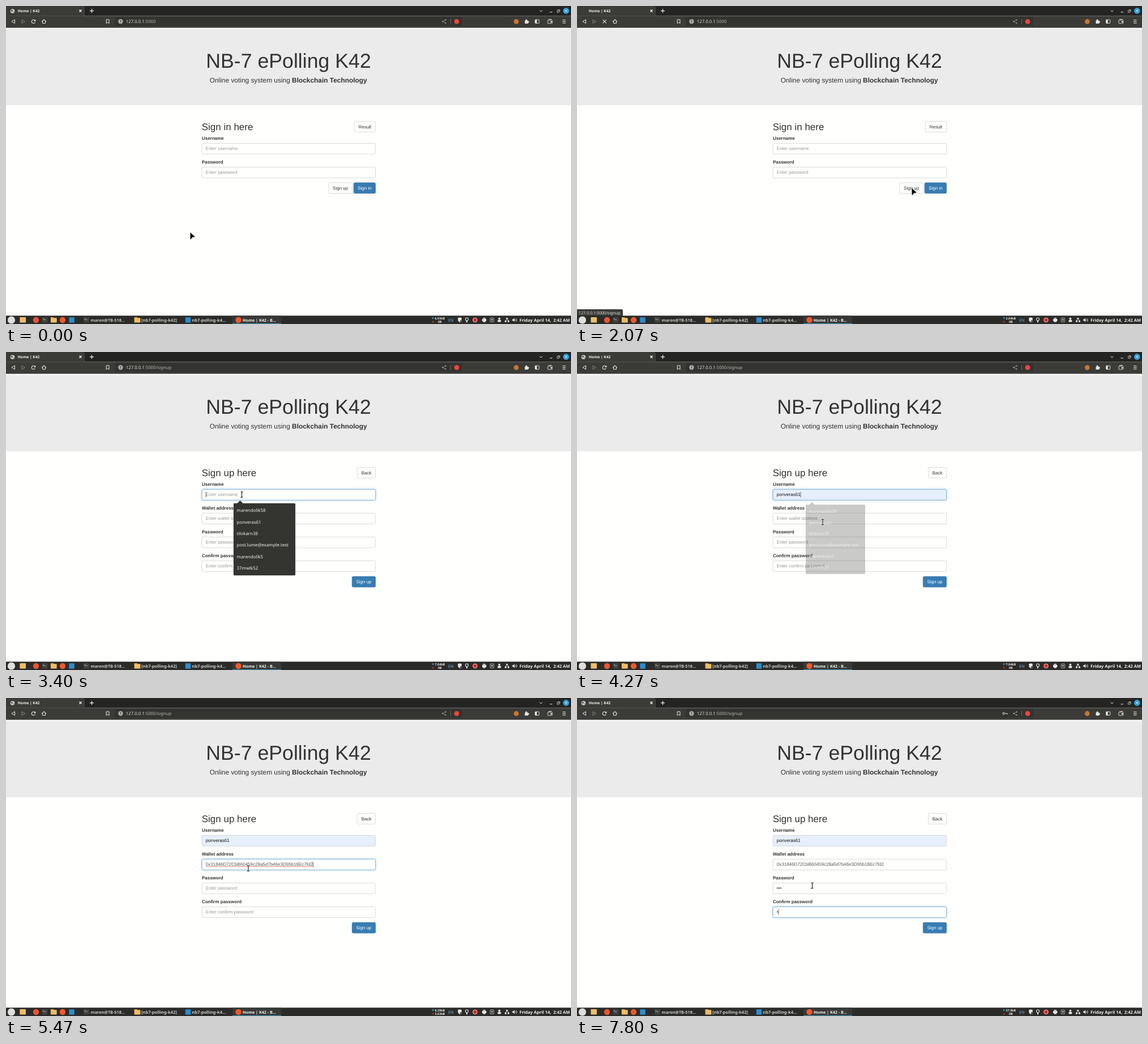
An HTML page with a canvas that plays this animation: 998x561 px, repeating every 8000 ms.

```html
<!DOCTYPE html>
<html lang="en">
<head>
<meta charset="utf-8">
<title>Sign up demo</title>
<style>
  html, body { margin: 0; width: 100%; height: 100%; overflow: hidden; background: #fffffd; }
  canvas { display: block; }
</style>
</head>
<body>
<canvas id="stage" width="998" height="561"></canvas>
<script>
const g = document.getElementById('stage').getContext('2d');
g.textRendering = 'geometricPrecision';
const LOOP = 8000;
const PAGE = '"Liberation Sans", Arial, sans-serif';
const UI = '"Noto Sans", "Open Sans", sans-serif';
const INK = '#333', LIGHT = '#e6e6e3', DARK = '#343431', PAPER = '#fffffd';
const USER = 'ponveras61';
const USERS = ['marendolik58', USER, 'tilokarn38', 'post.lume@example.test', 'marendolik5', '37mwlk52'];
const WALLETS = [
  '0x2a973650b14E8dAc9b5f36D4a1527A8c3394615b',
  '0x31846D72CbB60459c28a5d7b46e3D95b18Ec7fd2',
  '0x904C7a2D8e3fd185A86B2590413c7b382Ead9973',
  '0xc8B239a61b4d7f50342d9ae6c881356BDADAfCF7'
];

// Times in ms
const HOVER = 1400, LOADING = 2000, LOADED = 2330, READY = 2530;
const USER_FOCUS = 3200, USER_PICK = 4200;
const WALLET_FOCUS = 4600, WALLET_PICK = 5400;
const PASS_FOCUS = 6150, PASS_KEYS = [6670, 6870, 7070];
const CONFIRM_FOCUS = 7470, CONFIRM_KEYS = [7790];

const POINTER = [
  [0, 326, 400], [1030, 326, 400], [1200, 577, 321], [1400, 577, 321], [1600, 592, 322],
  [2400, 592, 322], [2900, 425, 262], [3130, 416.5, 251.5], [3560, 416.5, 251.5],
  [3730, 428, 296], [3930, 434, 300], [4330, 434, 300], [4500, 428, 300.5],
  [5800, 428, 300.5], [6100, 415.5, 331]
];
const TRAFFIC = [
  [0, '6.93kB', '0B'], [800, '4.12kB', '0B'], [1730, '2.04kB', '0B'], [2670, '8.31kB', '0B'],
  [3330, '7.04kB', '0B'], [4600, '5.35kB', '0B'], [5400, '6.29kB', '3.53kB'],
  [6200, '9.18kB', '0B'], [7530, '27.9kB', '0B']
];

const clamp = v => Math.max(0, Math.min(1, v));
const ramp = (t, start, length) => clamp((t - start) / length);
const smooth = p => p * p * (3 - 2 * p);

function text(s, x, y, size, color, { font = PAGE, bold = false, align = 'left' } = {}) {
  g.font = `${bold ? 'bold ' : ''}${size}px ${font}`;
  g.textAlign = align;
  g.fillStyle = color;
  g.fillText(s, x, y);
  return g.measureText(s).width;
}
function rect(x, y, w, h, color) {
  g.fillStyle = color;
  g.fillRect(x, y, w, h);
}
function box(x, y, w, h, r, fill, stroke, width = 0.7) {
  g.beginPath();
  g.roundRect(x, y, w, h, r);
  if (fill) { g.fillStyle = fill; g.fill(); }
  if (stroke) { g.strokeStyle = stroke; g.lineWidth = width; g.stroke(); }
}
function circle(x, y, r, fill, stroke, width = 1) {
  g.beginPath();
  g.arc(x, y, r, 0, 7);
  if (fill) { g.fillStyle = fill; g.fill(); }
  if (stroke) { g.strokeStyle = stroke; g.lineWidth = width; g.stroke(); }
}
function path(points, { fill, stroke, width = 1, close = !!fill }) {
  g.beginPath();
  for (let i = 0; i < points.length; i += 2) g.lineTo(points[i], points[i + 1]);
  if (close) g.closePath();
  if (fill) { g.fillStyle = fill; g.fill(); }
  if (stroke) { g.strokeStyle = stroke; g.lineWidth = width; g.stroke(); }
}
function cross(x, y, r, color, width = 1) {
  path([x - r, y - r, x + r, y + r], { stroke: color, width });
  path([x - r, y + r, x + r, y - r], { stroke: color, width });
}

function tabStrip(t) {
  rect(0, 0, 998, 17.5, '#242522');
  rect(0, 0, 138, 17.5, '#3b3b38');
  rect(138, 2, 0.7, 15, '#555552');
  if (t < LOADING || t >= READY) {
    circle(11.5, 9, 3.8, '#cfcfcc');
    path([8.5, 7.5, 11, 6.5, 12, 8.5, 10, 10.5], { fill: '#4b4b48' });
    path([12.5, 10, 14.5, 9, 13.5, 11.5], { fill: '#4b4b48' });
  }
  text('Home | K42', 20.8, 11.3, 6.6, '#f2f2ef', { font: UI, bold: true });
  cross(131.5, 8.5, 2, '#f2f2ef', 1.2);
  rect(148, 8, 7, 1.2, '#f2f2ef');
  rect(150.9, 5.1, 1.2, 7, '#f2f2ef');
  path([942.6, 7.5, 945, 10, 947.4, 7.5], { stroke: LIGHT });
  rect(960.5, 10.3, 4.5, 1, LIGHT);
  box(973.5, 7.8, 3.4, 3.4, 0, null, LIGHT);
  path([974.8, 6.6, 978.2, 6.6, 978.2, 10], { stroke: LIGHT, width: 0.7 });
  circle(989.3, 8.5, 5.4, '#2f9fd6');
  cross(989.3, 8.5, 1.9, '#fff');
}

function toolbar(t) {
  rect(0, 17.5, 998, 21, '#3b3b38');
  box(192, 19.5, 614, 15.5, 2, '#333330');
  path([15.5, 24, 15.5, 30.6, 10, 27.3], { stroke: LIGHT, close: true });
  path([28, 24, 28, 30.6, 33.5, 27.3], { stroke: '#858582', close: true });
  if (t >= LOADING && t < READY) {
    cross(48.7, 27.3, 3.1, LIGHT, 1.1);
  } else {
    g.beginPath();
    g.arc(48.5, 27.4, 3.1, 0.4, 5.5);
    g.strokeStyle = LIGHT;
    g.lineWidth = 1.1;
    g.stroke();
    path([52.3, 23.6, 52.3, 27, 49, 27], { fill: LIGHT });
  }
  path([63, 27.6, 67, 24, 71, 27.6], { stroke: LIGHT, width: 1.1 });
  path([64.6, 27, 64.6, 30.6, 69.4, 30.6, 69.4, 27], { stroke: LIGHT });
  path([177.2, 24, 182, 24, 182, 30.8, 179.6, 28.8, 177.2, 30.8], { stroke: LIGHT, close: true });
  circle(202.4, 27.3, 4.2, '#aaaaa7');
  rect(201.9, 24.8, 1, 3, DARK);
  rect(201.9, 28.6, 1, 1, DARK);

  const host = text('127.0.0.1', 211.8, 30.2, 7.75, '#dededb', { font: UI });
  text(t < LOADED ? ':5000' : ':5000/signup', 211.8 + host, 30.2, 7.75, '#b4b4b1', { font: UI });

  if (t >= PASS_KEYS[1]) {
    circle(753.6, 27.3, 1.7, null, '#b8b8b5', 1.2);
    path([755.4, 27.3, 760, 27.3, 760, 29], { stroke: '#b8b8b5', width: 1.3 });
  }
  path([776.4, 24.6, 771.3, 27.3, 776.4, 30], { stroke: '#aaaaa7', width: 0.7 });
  for (const [x, y] of [[776.4, 24.6], [771.3, 27.3], [776.4, 30]]) circle(x, y, 1.1, '#aaaaa7');
  rect(785, 22.5, 0.8, 9.5, '#777774');
  circle(796, 27.4, 4.4, '#e9473b');
  circle(901.3, 27.5, 4.4, '#c9762f');
  rect(916.5, 25.6, 5.8, 5.4, LIGHT);
  circle(919, 25, 1.5, LIGHT);
  circle(922.5, 28, 1.5, LIGHT);
  box(934.7, 24.2, 7, 6.3, 0.8, null, LIGHT, 0.9);
  rect(934.7, 24.2, 3, 6.3, LIGHT);
  box(957, 25, 7.8, 5.8, 0.8, null, LIGHT, 0.9);
  path([958, 24, 963.5, 23.4], { stroke: LIGHT });
  rect(961.6, 27, 3.2, 1.9, LIGHT);
  for (const y of [24.2, 26.9, 29.6]) rect(983, y, 5.6, 1, LIGHT);
}

function folder(x) {
  box(x - 5.4, 549, 5.5, 4, 0.7, '#d99a35');
  box(x - 5.4, 550.2, 10.8, 8.4, 0.8, '#f0bd66');
}
function terminal(x) {
  box(x - 5, 549, 10, 9.6, 1, '#42433f');
  path([x - 3.2, 551, x - 1.8, 552.2, x - 3.2, 553.4], { stroke: '#fff', width: 0.7 });
  rect(x - 1, 553.3, 2.4, 0.7, '#fff');
}
const browserMark = x => circle(x, 554, 5.2, '#f0592b');
const editorMark = x => rect(x - 4.7, 549.3, 9.4, 9.4, '#2b8ed0');

function taskbar(t) {
  const label = { font: UI, bold: true };
  rect(0, 546.3, 998, 14.7, '#2b2c29');
  rect(400, 546.3, 86, 14.7, '#383936');
  rect(400, 560, 86, 1, '#3f9bc8');
  circle(9.5, 554, 6.6, '#dededb');
  box(24.4, 549, 10.6, 9.6, 1, '#f0bd66');
  circle(53, 554, 5.2, '#ee5330');
  terminal(68.5);
  folder(84.3);
  browserMark(100);
  editorMark(116);
  terminal(142);
  text('maren@TB-518...', 149.5, 556.6, 7.3, '#c9c9c6', label);
  folder(232);
  text('[nb7-polling-k42]', 239, 556.6, 7.5, '#c9c9c6', label);
  editorMark(321.5);
  text('nb7-polling-k4...', 328.3, 556.6, 7.5, '#c9c9c6', label);
  browserMark(410.5);
  text('Home | K42 - B...', 418, 556.6, 7.2, '#f0f0ed', label);

  const [, down, up] = TRAFFIC.findLast(entry => entry[0] <= t);
  circle(754.2, 550.5, 1.5, '#3c8fc4');
  circle(754.2, 557, 1.5, '#c0302c');
  text(down, 766.3, 552.6, 5.3, '#f0f0ed', { ...label, align: 'center' });
  text(up, 766.3, 558.9, 5.3, '#f0f0ed', { ...label, align: 'center' });
  text('EN', 781, 556.6, 7.4, '#73a9da', { font: UI });

  path([798, 550.5, 801.5, 549.3, 805, 550.5, 804.4, 555.5, 801.5, 558.2, 798.6, 555.5], { fill: LIGHT });
  circle(803.7, 556, 2, '#555652');
  circle(814, 552.5, 2.5, null, LIGHT, 1.1);
  rect(813, 555, 2, 3.3, LIGHT);
  circle(828.5, 553.9, 3.8, '#e8231d', '#f3d8d3', 0.9);
  rect(841, 552, 7.4, 4, LIGHT);
  rect(842.6, 550, 4.2, 1.6, LIGHT);
  rect(842.6, 555, 4.2, 2.6, LIGHT);
  box(855.2, 550.3, 6.4, 7, 0.6, null, LIGHT);
  path([858.4, 551.8, 860.2, 554, 856.6, 554], { fill: LIGHT });
  rect(857.9, 554, 1, 1.6, LIGHT);
  circle(871.4, 551.8, 2, LIGHT);
  box(868.3, 554, 6.2, 3.5, 1.4, LIGHT);
  rect(883.4, 550, 3, 2.6, LIGHT);
  rect(881, 555, 3, 2.6, LIGHT);
  rect(886, 555, 3, 2.6, LIGHT);
  path([882.5, 555, 882.5, 553.8, 887.5, 553.8, 887.5, 555], { stroke: LIGHT, width: 0.7 });
  path([894.3, 552.6, 896, 552.6, 898.3, 550.4, 898.3, 557.4, 896, 555.3, 894.3, 555.3], { fill: LIGHT });
  for (const r of [2, 4]) {
    g.beginPath();
    g.arc(898.3, 554, r, -0.8, 0.8);
    g.strokeStyle = LIGHT;
    g.lineWidth = 0.9;
    g.stroke();
  }
  text('Friday April 14,  2:42 AM', 996, 556.6, 7.5, '#f0f0ed', { ...label, align: 'right' });
}

function button(label, x, y, w, primary) {
  box(x + 0.3, y + 0.3, w - 0.6, 18.8, 2.3, primary ? '#377cb2' : PAPER, primary ? '#3271a6' : '#ccc');
  text(label, x + w / 2, y + 12.3, 8, primary ? '#fff' : INK, { align: 'center' });
}

function field(index, label, hint, state = {}) {
  const { value = '', color = '#555', filled, glow = 0, caret, misspelt } = state;
  const y = 242 + index * 42;
  text(label, 345.9, y - 6, 8, INK, { bold: true });
  g.save();
  if (glow > 0) {
    g.shadowColor = `rgba(102,175,233,${0.6 * glow})`;
    g.shadowBlur = 4.6;
  }
  box(346, y + 0.3, 306.7, 19, 2.3, filled ? '#e6effb' : PAPER);
  g.restore();
  box(346, y + 0.3, 306.7, 19, 2.3, null, '#ccc');
  if (glow > 0) box(346, y + 0.3, 306.7, 19, 2.3, null, `rgba(102,175,233,${glow})`);
  const width = text(value || hint, 352.8, y + 12, 8, value ? color : '#999');
  const end = 352.8 + (value ? width : 0);
  if (misspelt) rect(352.8, y + 13.3, width, 0.7, '#e0574f');
  if (caret) rect(end + 0.1, y + 4.8, 0.7, 9.4, '#222');
}

function popup(items, y, w, alpha, active) {
  if (alpha <= 0) return;
  const h = items.length * 20.45 + 4.4;
  const scale = 0.95 + 0.05 * alpha;
  const opaque = alpha === 1;
  g.save();
  g.translate(402 + w / 2, y + h / 2);
  g.scale(scale, scale);
  g.translate(-402 - w / 2, -y - h / 2);
  g.globalAlpha = alpha;
  g.shadowColor = 'rgba(0,0,0,.35)';
  g.shadowBlur = opaque ? 2 : 0;
  g.beginPath();
  g.roundRect(402, y, w, h, 1.5);
  g.moveTo(408.5, y);
  g.lineTo(413.5, y - 4.8);
  g.lineTo(418.5, y);
  g.fillStyle = DARK;
  g.fill();
  g.shadowBlur = 0;
  if (opaque && active >= 0) rect(402, y + 2.2 + active * 20.45, w, 20.45, '#50504d');
  g.globalAlpha = 1;
  items.forEach((item, i) => text(item, 407.6, y + 15.1 + i * 20.45, 7.85, '#efefec', { font: UI }));
  g.restore();
}

const glowBetween = (t, start, end) => smooth(ramp(t, start, 150)) * (1 - smooth(ramp(t, end, 150)));
const popupAlpha = (t, start, end) => ramp(t, start, 90) * (1 - ramp(t, end, 96));

// The caret restarts its blink at each input event.
function caretOn(t, events, end) {
  const last = events.findLast(e => e <= t);
  return last !== undefined && t < end && Math.floor((t - last) / 500) % 2 === 0;
}
const bullets = (t, keys) => '•'.repeat(keys.filter(k => k <= t).length);

function signInPage() {
  text('Sign in here', 345.7, 218.8, 17, INK);
  button('Result', 615, 203.2, 38);
  field(0, 'Username', 'Enter username');
  field(1, 'Password', 'Enter password');
  button('Sign up', 569.5, 311.5, 42.3);
  button('Sign in', 613.8, 311.5, 39.2, true);
}

function signUpPage(t) {
  const hoverRow = t < 3650 ? -1 : t < 3730 ? 0 : 1;
  const keyRow = t < 5270 ? -1 : t < 5335 ? 0 : 1;
  text('Sign up here', 345.7, 218.8, 17, INK);
  button('Back', 620.2, 203.2, 32.8);
  field(0, 'Username', 'Enter username', {
    value: hoverRow < 0 ? '' : USERS[hoverRow], color: '#111', filled: hoverRow >= 0,
    glow: glowBetween(t, USER_FOCUS, WALLET_FOCUS - 100),
    caret: caretOn(t, [USER_FOCUS, USER_PICK], WALLET_FOCUS - 100)
  });
  field(1, 'Wallet address', 'Enter wallet address', {
    value: keyRow < 0 ? '' : WALLETS[keyRow], filled: keyRow >= 0 && t < WALLET_PICK,
    glow: glowBetween(t, WALLET_FOCUS - 50, PASS_FOCUS),
    caret: caretOn(t, [WALLET_FOCUS, WALLET_PICK], PASS_FOCUS),
    misspelt: t >= WALLET_PICK && t < PASS_FOCUS
  });
  field(2, 'Password', 'Enter password', {
    value: bullets(t, PASS_KEYS), color: INK,
    glow: glowBetween(t, PASS_FOCUS, CONFIRM_FOCUS),
    caret: caretOn(t, [PASS_FOCUS, ...PASS_KEYS], CONFIRM_FOCUS)
  });
  field(3, 'Confirm password', 'Enter confirm password', {
    value: bullets(t, CONFIRM_KEYS), color: INK,
    glow: glowBetween(t, CONFIRM_FOCUS, LOOP),
    caret: caretOn(t, [CONFIRM_FOCUS, ...CONFIRM_KEYS], LOOP)
  });
  button('Sign up', 611, 395.7, 42, true);
  popup(USERS, 267, 109, popupAlpha(t, USER_FOCUS + 80, USER_PICK), hoverRow);
  popup(WALLETS, 309, 211.5, popupAlpha(t, WALLET_FOCUS + 30, WALLET_PICK - 30), keyRow);
}

function pointer(t) {
  const i = POINTER.findLastIndex(k => k[0] <= t);
  const [t0, x0, y0] = POINTER[i];
  const [t1, x1, y1] = POINTER[i + 1] || [LOOP, x0, y0];
  const p = smooth(ramp(t, t0, t1 - t0));
  const x = x0 + (x1 - x0) * p, y = y0 + (y1 - y0) * p;
  const overPopup = t > USER_FOCUS && t < USER_PICK && y > 267;
  const overField = t > LOADED && x < 653 && y > 242 && (y - 242) % 42 < 19.5;
  g.save();
  g.translate(x, y);
  g.lineJoin = 'round';
  if (overField && !overPopup) {
    const beam = [-2, -4.8, 2, -4.8, 0, -4.8, 0, 4.8, -2, 4.8, 2, 4.8];
    path(beam, { stroke: '#fff', width: 2 });
    path(beam, { stroke: '#111', width: 1.1 });
  } else {
    path([-0.4, 0, 7.4, 7, 3.2, 7.8, 0, 11.8], { fill: '#000', stroke: '#000', width: 0.5 });
  }
  g.restore();
}

function draw(t) {
  rect(0, 0, 998, 561, PAPER);
  rect(0, 40.5, 998, 134.5, '#ecebeb');
  text('NB-7 ePolling K42', 499, 109, 35.7, INK, { align: 'center' });
  const lead = text('Online voting system using ', 359.7, 134.7, 11.9, INK);
  text('Blockchain Technology', 359.7 + lead, 134.7, 11.9, INK, { bold: true });
  if (t < LOADED) signInPage(); else signUpPage(t);
  if (t >= HOVER && t < LOADED + 70) {
    box(-3, 535, 84, 14, 2, '#3b3b38');
    text('127.0.0.1:5000/signup', 2.8, 543.8, 7.14, '#e0e0dd', { font: UI });
  }
  tabStrip(t);
  toolbar(t);
  taskbar(t);
  pointer(t);
}

const start = performance.now();
function tick(now) {
  draw(Math.max(0, now - start) % LOOP);
  requestAnimationFrame(tick);
}
draw(0);
requestAnimationFrame(tick);
</script>
</body>
</html>
```
